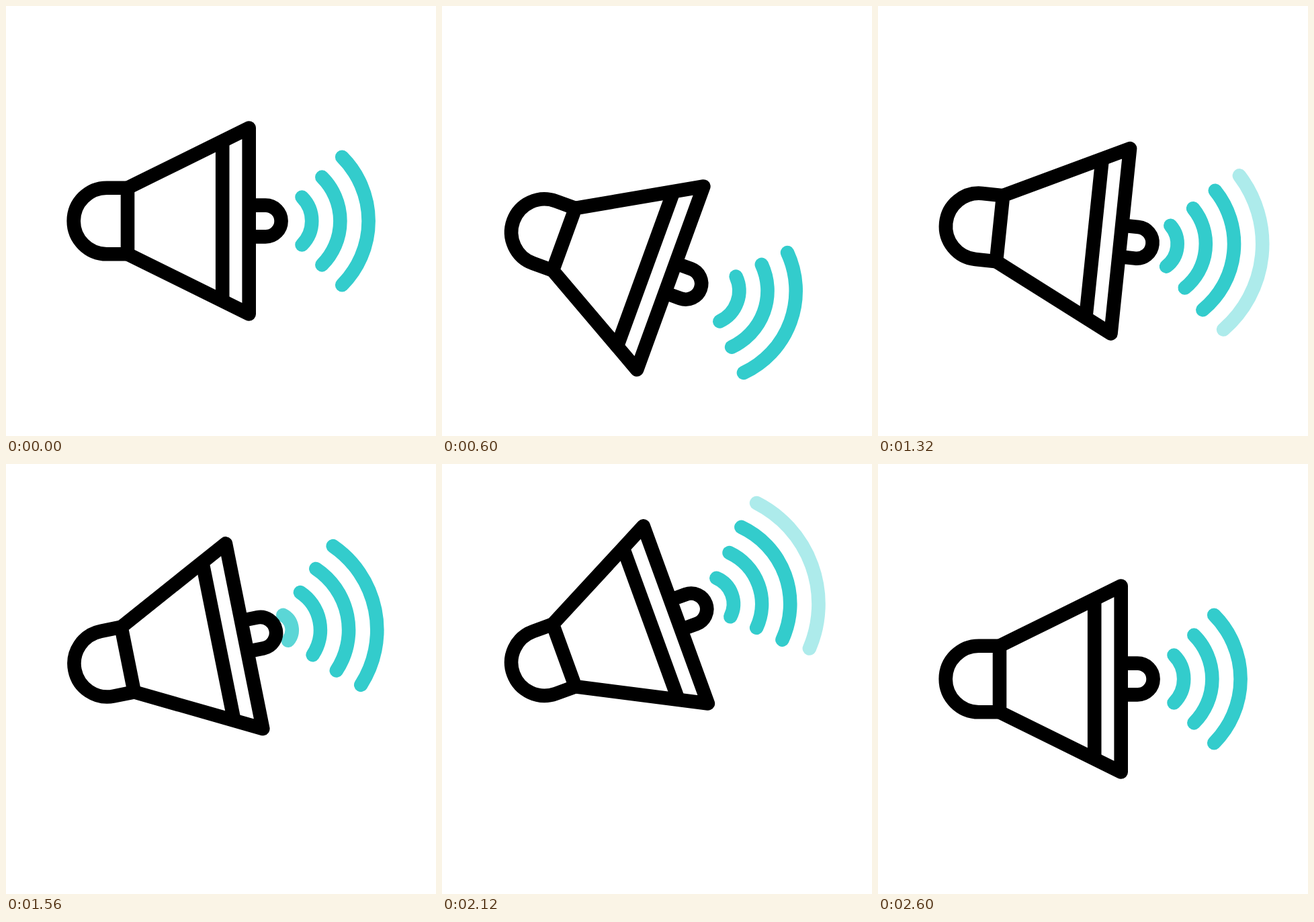
An HTML page for the animation above (3000 ms loop, 640 by 640 pixels).

```html
<!DOCTYPE html>
<html lang="en">
<head>
<meta charset="utf-8">
<title>Megaphone</title>
<style>
  html, body { margin: 0; width: 100%; height: 100%; overflow: hidden; background: #fff; }
  svg { display: block; width: 100%; height: 100%; }
  path { fill: none; stroke-width: 20.6; stroke-linecap: round; stroke-linejoin: round; }
  #waves path { stroke: #3cc; }
  #horn path { stroke: #000; }
  #horn .flat { stroke-linecap: butt; }
</style>
</head>
<body>
<svg viewBox="0 0 640 640">
  <g id="rig">
    <g id="waves"><path/><path/><path/><path/></g>
    <g id="horn">
      <path d="M31-49.3H0A49.3 49.3 0 0 0 0 49.3H31"/>
      <path id="bell"/>
      <path id="band" class="flat"/>
      <path id="knob" class="flat"/>
    </g>
  </g>
</svg>
<script>
const LOOP = 3000, START = 200, LENGTH = 2400, STEP = 20;
const BEAT = 400, PULSE = 560, LEG = LENGTH / 3;

const $ = id => document.getElementById(id);
const rig = $('rig'), bell = $('bell'), band = $('band'), knob = $('knob');
const waves = [...$('waves').children];

const clamp = (v, lo = 0, hi = 1) => Math.min(hi, Math.max(lo, v));
const mix = (a, b, k) => a + (b - a) * k;

function ease(t, start, span) {
  const k = clamp((t - start) / span);
  return k * k * (3 - 2 * k);
}

// 0 to 1, over to -1, then back to 0
const swing = (t, rise, cross) =>
  ease(t, 0, rise) - 2 * ease(t, LEG, cross) + ease(t, LENGTH - rise, rise);

// two pulses on each side of the middle
const squeeze = t =>
  Math.sin(Math.PI * Math.min(t, LENGTH - t, 2 * PULSE) / PULSE) ** 2;

function drawHorn(s) {
  const x = 211.7 - 20.3 * s, h = 138.5 + 10.8 * s;
  const bx = x - 39.5, bh = mix(49.3, h, (bx - 31) / (x - 31));
  bell.setAttribute('d', `M31-49.3L${x} ${-h}V${h}L31 49.3Z`);
  band.setAttribute('d', `M${bx} ${-bh}V${bh}`);
  knob.setAttribute('d', `M${x}-23.4h24.5a23.4 23.4 0 0 1 0 46.8h-24.5`);
}

// each wave grows into the next one; the first fades in, the last fades out
function drawWaves(p) {
  const last = waves.length - 1;
  waves.forEach((wave, i) => {
    const age = i + p, r = 8 + 42.2 * age;
    const spread = 45 + 10 * clamp(1 - age) - 2.3 * clamp(age - last);
    const angle = spread * Math.PI / 180;
    const x = 255 + r * Math.cos(angle), y = r * Math.sin(angle);
    wave.setAttribute('d', `M${x} ${-y}A${r} ${r} 0 0 1 ${x} ${y}`);
    wave.style.opacity = clamp(2 * Math.min(age, last + 1 - age));
  });
}

function frame() {
  const clock = Math.floor(performance.now() % LOOP / STEP) * STEP;
  const t = clamp(clock - START, 0, LENGTH);
  const y = 320 + 48.7 * swing(t, 680, 770), turn = 20 * swing(t, BEAT, LEG);
  rig.setAttribute('transform', `translate(191 ${y}) rotate(${turn}) translate(-41 0)`);
  drawHorn(squeeze(t));
  drawWaves(t % BEAT / BEAT);
  requestAnimationFrame(frame);
}
frame();
</script>
</body>
</html>
```
